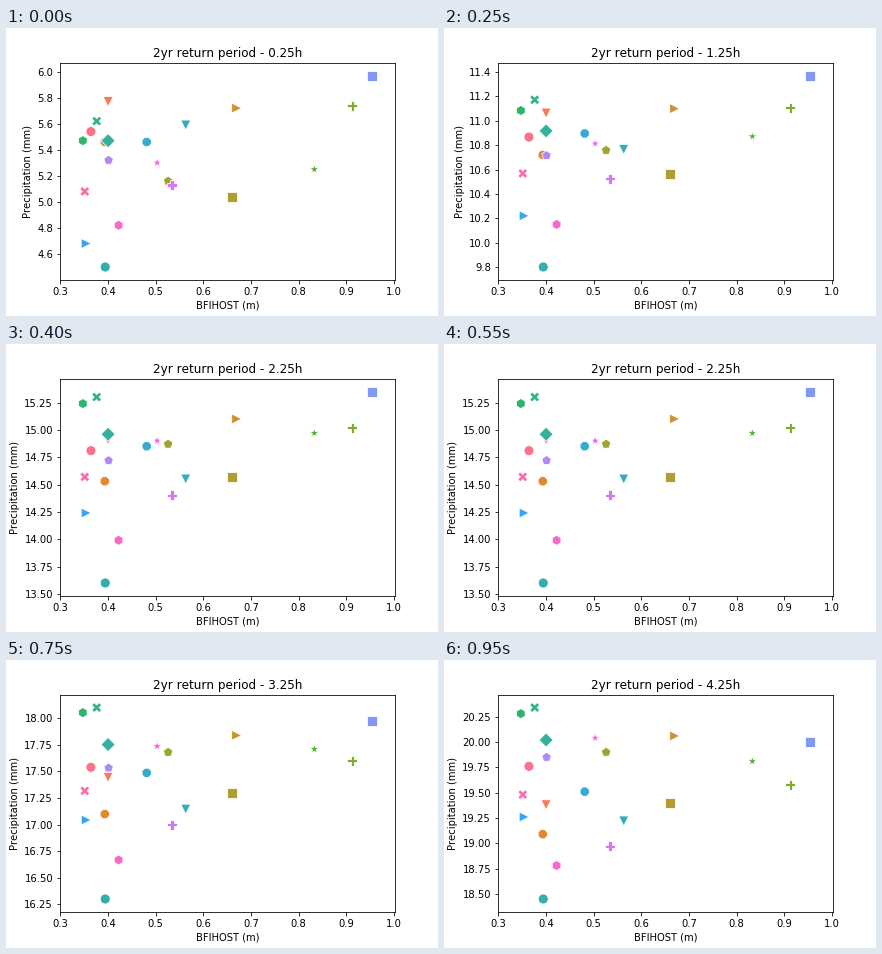
These frames come from a looping animation (432 by 288 pixels, 1 s). A matplotlib script:

```python
import numpy as np
import matplotlib.pyplot as plt
from matplotlib.animation import FuncAnimation
from matplotlib.markers import MarkerStyle

plt.rcParams["text.kerning_factor"] = 6

XYZ_TO_RGB = np.array([[3.2406, -1.5372, -0.4986],
                       [-0.9689, 1.8758, 0.0415],
                       [0.0557, -0.2040, 1.0570]])


def husl_color(hue, sat=0.9, light=65):
    """Perceptually even colour; hue in degrees."""
    cos_h, sin_h = np.cos(np.radians(hue)), np.sin(np.radians(hue))
    lum = ((light + 16) / 116) ** 3
    sub = (light + 16) ** 3 / 1560896
    reach = []
    for m1, m2, m3 in XYZ_TO_RGB:
        for t in (0, 1):
            bottom = (632260 * m3 - 126452 * m2) * sub + 126452 * t
            slope = (284517 * m1 - 94839 * m3) * sub / bottom
            offset = light * ((838422 * m3 + 769860 * m2 + 731718 * m1) * sub
                              - 769860 * t) / bottom
            reach.append(offset / (sin_h - slope * cos_h))
    chroma = sat * min(r for r in reach if r > 0)
    u = cos_h * chroma / (13 * light) + 0.19783
    v = sin_h * chroma / (13 * light) + 0.46832
    x = 9 * lum * u / (4 * v)
    z = (9 * lum - 15 * v * lum - v * x) / (3 * v)
    rgb = np.clip(XYZ_TO_RGB @ [x, lum, z], 0, 1)
    return np.where(rgb <= 0.0031308, 12.92 * rgb,
                    1.055 * rgb ** (1 / 2.4) - 0.055).clip(0, 1)


STEPS = 5
MARKERS = "ov8>spP*hXD"
DRIEST = [4.50, 9.80, 13.60, 16.30, 18.45]

# BFIHOST, then rainfall above the driest site at the first, middle, last step
SITES = np.array([
    (0.364, 1.04, 1.21, 1.31), (0.400, 1.27, 1.31, 0.93),
    (0.393, 0.96, 0.93, 0.64), (0.670, 1.22, 1.50, 1.61),
    (0.660, 0.54, 0.97, 0.95), (0.526, 0.66, 1.27, 1.45),
    (0.913, 1.24, 1.42, 1.13), (0.833, 0.75, 1.37, 1.36),
    (0.347, 0.97, 1.64, 1.83), (0.376, 1.12, 1.70, 1.89),
    (0.400, 0.97, 1.36, 1.57), (0.394, 0.00, 0.00, 0.00),
    (0.563, 1.09, 0.95, 0.77), (0.481, 0.96, 1.25, 1.06),
    (0.354, 0.18, 0.64, 0.81), (0.954, 1.47, 1.75, 1.55),
    (0.401, 0.82, 1.12, 1.40), (0.534, 0.63, 0.80, 0.52),
    (0.503, 0.80, 1.30, 1.59), (0.422, 0.32, 0.39, 0.33),
    (0.351, 0.58, 0.97, 1.03),
])


def rainfall(step):
    """Parabola through the three key steps, sagging slightly between them."""
    first, middle, last = SITES[:, 1:].T
    t = step / 2 - 1
    excess = middle + t * (last - first) / 2 + t * t * ((first + last) / 2 - middle)
    sag = 0.018 * (4.3 - step) * np.sin(np.pi * step / 2) ** 2
    return DRIEST[step] + excess * (1 - sag)


def marker_path(symbol):
    style = MarkerStyle(symbol)
    return style.get_path().transformed(style.get_transform())


count = len(SITES)
hues = (np.arange(count) / count + 0.01) * 359

fig, ax = plt.subplots(figsize=(6, 4), dpi=72, facecolor="white")
fig.subplots_adjust(left=0.125, right=0.9, bottom=0.125, top=0.88)
points = ax.scatter(SITES[:, 0], rainfall(0), s=100, edgecolors="white",
                    linewidths=0.8, facecolors=[husl_color(h) for h in hues])
points.set_paths([marker_path(MARKERS[i % len(MARKERS)]) for i in range(count)])
ax.set_xlim(0.299, 1.002)
ax.set_xlabel("BFIHOST (m)")
ax.set_ylabel("Precipitation (mm)")


def draw(step):
    depth = rainfall(step)
    low, high = depth.min(), depth.max()
    pad = 0.068 * (high - low)
    points.set_offsets(np.column_stack([SITES[:, 0], depth]))
    ax.set_ylim(low - pad, high + pad)
    ax.set_title(f"2yr return period - {step + 0.25}h")
    return [points]


anim = FuncAnimation(fig, draw, frames=STEPS, interval=1000 // STEPS,
                     repeat=True, repeat_delay=0, blit=False)
plt.show()
```
